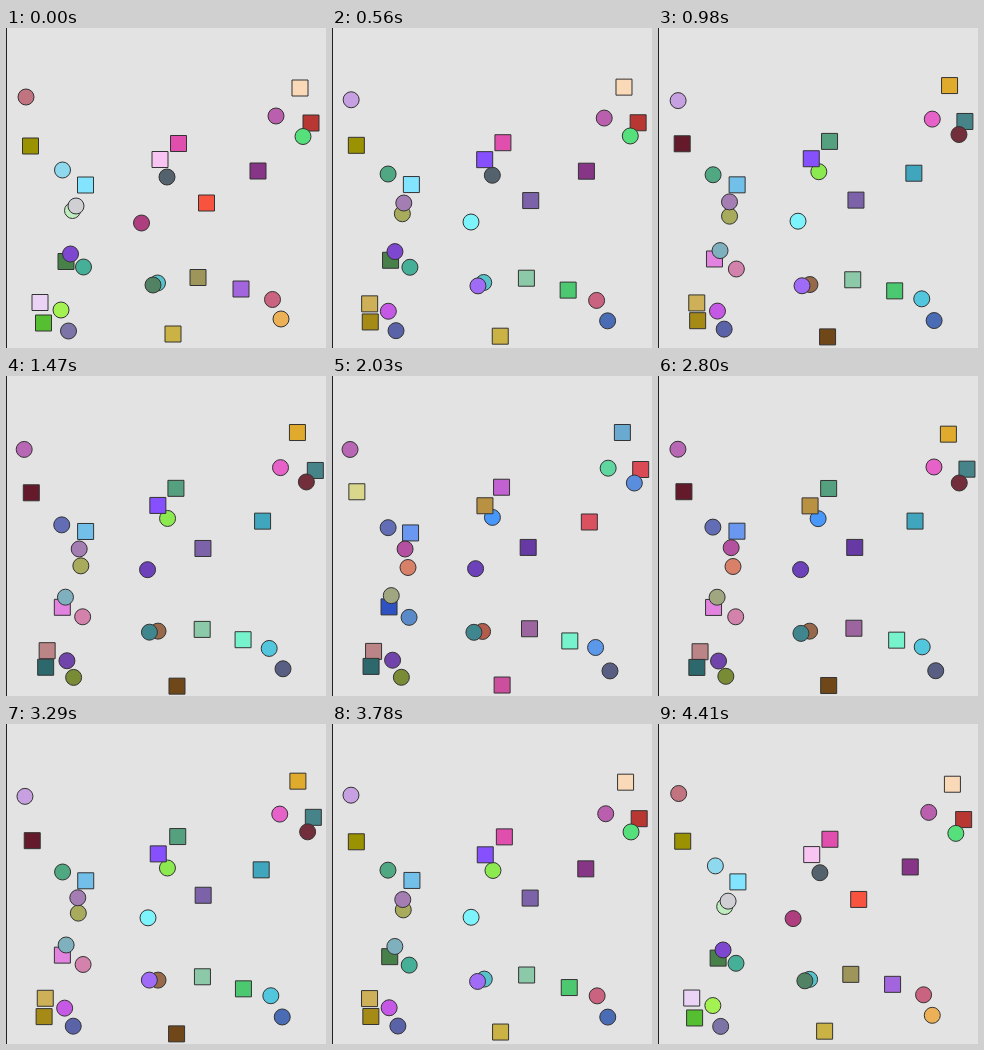
Recreate the animation shown at these times as an HTML page with a canvas. Size 320 by 320 pixels, loop 4480 ms.

```html
<!DOCTYPE html>
<html lang="en">
<head>
<meta charset="utf-8">
<title>Jittering shapes</title>
<style>
html, body { margin: 0; width: 100%; height: 100%; overflow: hidden; background: #e3e3e3; }
canvas { display: block; }
</style>
</head>
<body>
<canvas id="stage" width="320" height="320"></canvas>
<script>
const ctx = document.getElementById('stage').getContext('2d');
const STEP_MS = 70, TURN = 32, SIZE = 16;
// step of the first colour switch; the second follows COLOR_STEPS later
const EARLY = 6, MIDDLE = 8, NEXT = 9, LATE = 13, COLOR_STEPS = 14;
const shapes = [];

// x, y: starting centre; dx, dy: drift until the turn
function add(kind, change, colors, x, y, dx, dy) {
  shapes.push({ kind, change, colors: colors.split(' '), x, y, dx, dy });
}
const square = (...args) => add('square', ...args);
const circle = (...args) => add('circle', ...args);

circle(NEXT, '#54626d #8cea50 #4897fb', 161, 149, 0, -7);

square(LATE, '#fad9b8 #e0ab2d #6aa9d0', 294, 60, -3, -3);
square(LATE, '#b83733 #468489 #d94a55', 305, 95, 4, -1);
square(LATE, '#9a9200 #651a2b #d9d78c', 24.5, 118, 1, -2);
square(LATE, '#e04fae #55a07e #c262d2', 172.5, 115.5, -2, -4);
square(MIDDLE, '#f8c4f2 #8650ff #b89143', 154, 131.5, -2, -2);
square(LATE, '#873586 #40a6bd #da5260', 252, 143, 5, 3);
square(NEXT, '#83e4ff #72bfea #6a98f0', 79.5, 157, -1, -1);
square(MIDDLE, '#f7533f #7c63a9 #6639a5', 200.5, 175, -5, -4);
square(LATE, '#48804a #e283e0 #2f52c2', 60, 233.5, -4, -3);
square(MIDDLE, '#9e955a #8cc9a8 #9c659f', 192, 249.5, 5, 4);
square(EARLY, '#a365dd #4cc970 #76f2cd', 235, 261, 3, 4);
square(EARLY, '#ebd3f6 #cdb057 #bb8487', 34, 274.5, 8, 1);
square(EARLY, '#56be31 #a68a16 #2c686c', 37.5, 295, 2, -4);
square(LATE, '#cbb245 #704719 #cc4f9e', 167, 306, 4, 4);

circle(EARLY, '#c17480 #c6a0e0 #b867b5', 20, 69, -1, 5);
circle(LATE, '#b95fad #e661c8 #5fd5a0', 270, 88, 6, 4);
circle(LATE, '#56e07c #722f3b #5a8ddd', 297, 108.5, 5, -2);
circle(EARLY, '#8fd9ee #50a883 #626db5', 56.5, 142, -1, 9);
circle(MIDDLE, '#c0edbf #a8aa5c #d98068', 66.5, 182.5, 9, 9);
circle(MIDDLE, '#cfcfd4 #a47db3 #b450a0', 70, 178, 3, -6);
circle(EARLY, '#ae3e7e #7df3fb #6d41b9', 135.5, 195, 8, -2);
circle(NEXT, '#7e47cf #7fb0be #a0a680', 64.5, 226, -5, -6);
circle(LATE, '#46af97 #d382ac #5a8bc8', 77.5, 239, 0, 3);
circle(LATE, '#58c2cc #97694a #b35c4c', 151.5, 255, 0, 1);
circle(EARLY, '#508263 #a06bf6 #40868f', 147, 257, -5, 0);
circle(EARLY, '#a4f251 #c658e6 #7044aa', 55, 282, 6, 3);
circle(EARLY, '#7c74a6 #5a62a8 #7a8b35', 62.5, 303, 6, -2);
circle(LATE, '#ca637f #52c6dd #5b98e9', 266.5, 271.5, -3, 0);
circle(EARLY, '#ecb057 #496cb5 #585f83', 275, 291, 2, 3);

// seeded shake between -1 and 1, at rest on step 0
const shake = (seed, step) => Math.sin(seed * step * 12.9898) * 43758.5453 % 1;

function draw(step) {
  const drift = Math.sin(step / TURN * Math.PI / 2);
  ctx.fillStyle = '#e3e3e3';
  ctx.fillRect(0, 0, 320, 320);
  ctx.fillStyle = '#222';
  ctx.fillRect(0, 0, 1, 320);
  ctx.strokeStyle = '#333';
  shapes.forEach((shape, i) => {
    const x = shape.x + shape.dx * drift + shake(i * 2 + 1, step);
    const y = shape.y + shape.dy * drift + shake(i * 2 + 2, step);
    const switches = Math.floor((step - shape.change) / COLOR_STEPS) + 1;
    ctx.fillStyle = shape.colors[Math.min(switches, 2)];
    ctx.beginPath();
    if (shape.kind === 'square') ctx.rect(x - SIZE / 2, y - SIZE / 2, SIZE, SIZE);
    else ctx.arc(x, y, SIZE / 2, 0, Math.PI * 2);
    ctx.fill();
    ctx.stroke();
  });
}

// the walk runs forward, then back along the same steps
const start = performance.now();
function tick() {
  const step = Math.floor(Math.max(0, performance.now() - start) / STEP_MS) % (TURN * 2);
  draw(Math.min(step, TURN * 2 - step));
  requestAnimationFrame(tick);
}
tick();
</script>
</body>
</html>
```
